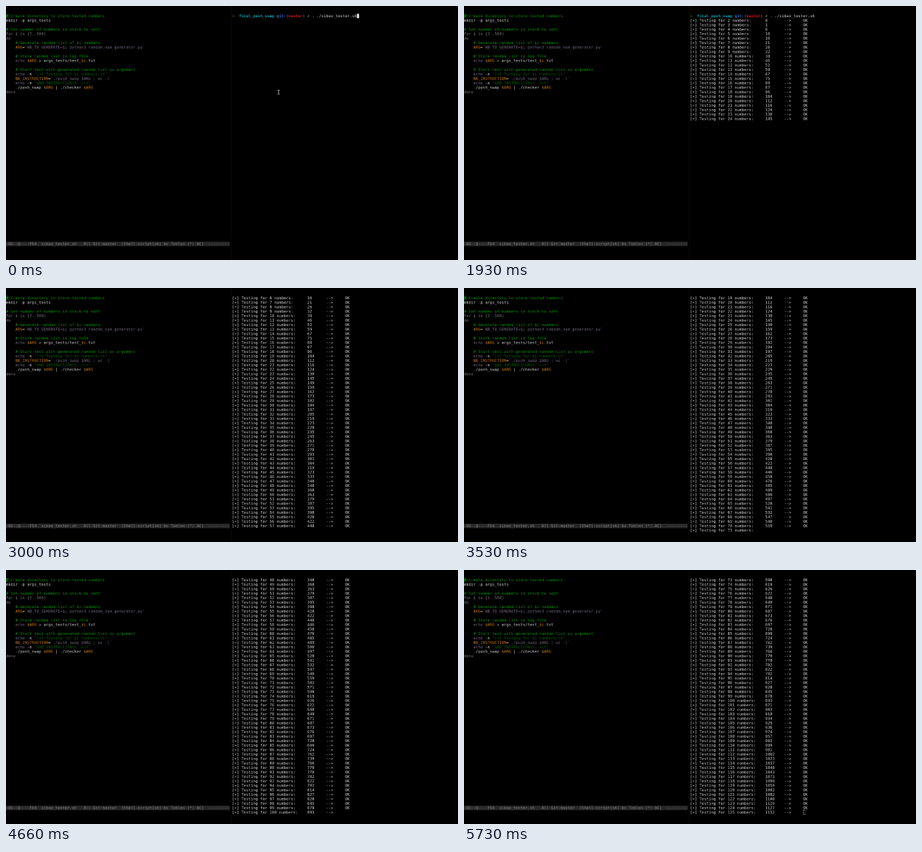
An HTML page with a canvas that plays this animation: 640 px wide and 360 px high, repeating every 5800 ms.

```html
<!DOCTYPE html>
<html lang="en">
<head>
<meta charset="utf-8">
<title>Sort tester</title>
<style>
html, body { margin: 0; width: 100%; height: 100%; overflow: hidden; background: #000; }
canvas { display: block; width: 640px; height: 360px; }
</style>
</head>
<body>
<canvas id="stage" width="640" height="360"></canvas>
<script>
const LOOP = 5800, FRAMES = 87, FPMS = 0.015;
const CW = 10, LH = 19, TOP = 33, ASCENT = 15, LAST_ROW = 52;
const RIGHT = 960, ENTER = 1000, BLINK = 640, BLUR = 5700;
const FONT = '16px "DejaVu Sans Mono", "DejaVu Sans", monospace';

const WHITE = '#dedede', GREEN = '#0a9c0a', STRING = '#0a640a', GREY = '#7c7c7c',
      MAUVE = '#766c80', ORANGE = '#d27e1a', BAR = '#272727', BAR_TEXT = '#888',
      TEAL = '#18a2ae', BLUE = '#3c64c4', RED = '#c01c1c', YELLOW = '#d0b420';

// Key points: time in ms, tests finished by then
const PACE = [[1165, 0], [3000, 56.3], [4000, 81.3], [4667, 98.87], [LOOP, 125.45]];

// Row, column, then colour and text in turn
const SCRIPT = [
  [0, 0, GREEN, '# Create directory to store tested numbers'],
  [1, 0, WHITE, 'mkdir -p args_tests'],
  [3, 0, GREEN, '# Set number of numbers in stack to sort'],
  [4, 0, GREY, 'for ', WHITE, 'i ', GREY, 'in {2..500}'],
  [5, 0, GREY, 'do'],
  [6, 4, GREEN, '# Generate random list of $i numbers'],
  [7, 4, ORANGE, 'ARG', WHITE, '=', MAUVE, '`NB_TO_GENERATE=$i python3 random_num_generator.py`'],
  [9, 4, GREEN, '# Store random list in log file'],
  [10, 4, MAUVE, 'echo ', ORANGE, '$ARG', WHITE, ' > args_tests/test_', ORANGE, '$i', WHITE, '.txt'],
  [12, 4, GREEN, '# Start test with generated random list as argument'],
  [13, 4, MAUVE, 'echo ', WHITE, '-n ', STRING, '"[+] Testing for $i numbers:\\t"'],
  [14, 4, ORANGE, 'NB_INSTRUCTION', WHITE, '=', MAUVE, '`./push_swap $ARG | wc -l`'],
  [15, 4, MAUVE, 'echo ', WHITE, '-n ', STRING, '"$NB_INSTRUCTION\\t-->\\t"'],
  [16, 4, WHITE, './push_swap ', ORANGE, '$ARG', WHITE, ' | ./checker ', ORANGE, '$ARG'],
  [17, 0, GREY, 'done']
];
const STATUS = '-UU-:@----F64  xibao_tester.sh   All Git:master  (Shell-script[sh] bs Toblen (*) AC)  ---------';
const PROMPT = [GREEN, '➜  ', TEAL, 'final_push_swap ', BLUE, 'git:(', RED, 'master',
                BLUE, ') ', YELLOW, '✗ ', WHITE, '. ./xibao_tester.sh'];

const out = document.getElementById('stage').getContext('2d');
const screen = document.createElement('canvas');
screen.width = 1920;
screen.height = 1080;
const g = screen.getContext('2d');

const rowY = row => TOP + row * LH;

// Sorting cost grows as n log n, with a few percent of seeded scatter
function instructions(n) {
  const noise = Math.sin(n * 127.1) * 43758.5453;
  const scatter = (noise - Math.floor(noise) - 0.5) * 0.06;
  return Math.max(0, Math.round(1.33 * n * Math.log2(n) * (1 + scatter) - 5));
}

function text(x, row, str, color, bold) {
  g.font = (bold ? 'bold ' : '') + FONT;
  g.fillStyle = color;
  for (const ch of str) {
    if (ch !== ' ') g.fillText(ch, x, rowY(row) + ASCENT);
    x += CW;
  }
  return x;
}

function runs(x, row, parts, bold) {
  for (let i = 0; i < parts.length; i += 2) {
    x = text(x, row, parts[i + 1], parts[i], bold && parts[i] !== WHITE);
  }
}

function block(x, row) {
  g.fillStyle = WHITE;
  g.fillRect(x, rowY(row), CW, LH);
}

function hollow(x, row, color) {
  g.strokeStyle = color;
  g.lineWidth = 1;
  g.strokeRect(x + 0.5, rowY(row) + 0.5, CW - 1, LH - 1);
}

function pointer() {
  g.strokeStyle = WHITE;
  g.lineWidth = 2;
  g.beginPath();
  g.moveTo(1153, 358); g.lineTo(1163, 358);
  g.moveTo(1158, 358); g.lineTo(1158, 375);
  g.moveTo(1153, 375); g.lineTo(1163, 375);
  g.stroke();
}

function testsDone(t) {
  if (t <= PACE[0][0]) return 0;
  const i = PACE.findIndex(p => t <= p[0]);
  const [t0, n0] = PACE[i - 1], [t1, n1] = PACE[i];
  return n0 + (n1 - n0) * (t - t0) / (t1 - t0);
}

function drawEditor() {
  for (const [row, col, ...parts] of SCRIPT) runs(col * CW, row, parts);
  hollow(0, 0, GREEN);
  g.fillStyle = BAR;
  g.fillRect(0, rowY(51), 95 * CW, LH);
  text(0, 51, STATUS, BAR_TEXT);
  g.fillStyle = '#121212';
  g.fillRect(956, 0, 2, 1080);
}

function drawTerminal(t) {
  const progress = testsDone(t), done = Math.floor(progress), phase = progress - done;
  const line = done + 1;
  const top = Math.max(0, line - LAST_ROW);
  if (!top) runs(RIGHT, 0, PROMPT, true);

  // The newest line prints in steps: label, then count, then result
  const col = phase < 0.6 ? 0 : phase < 0.75 ? 32 : 48;
  for (let n = Math.max(1, top); n <= line; n++) {
    const row = n - top, reached = n === line ? col : 56;
    if (reached >= 32) text(RIGHT, row, `[+] Testing for ${n + 1} numbers:`, WHITE);
    if (reached >= 48) {
      text(RIGHT + 32 * CW, row, String(instructions(n + 1)), WHITE);
      text(RIGHT + 40 * CW, row, '-->', WHITE);
    }
    if (reached >= 56) text(RIGHT + 48 * CW, row, 'OK', WHITE);
  }

  const x = RIGHT + col * CW, row = line - top;
  if (t < ENTER) {
    block(RIGHT + 53 * CW, 0);
    pointer();
  } else if (t > BLUR) {
    hollow(x, row, WHITE);
  } else if (Math.floor((t - ENTER) / BLINK) % 2 === 0) {
    block(x, row);
  }
}

let shown = -1;
function tick(now) {
  const index = Math.floor((now % LOOP + 6.7) * FPMS) % FRAMES;
  if (index !== shown) {
    shown = index;
    g.fillStyle = '#000';
    g.fillRect(0, 0, 1920, 1080);
    drawEditor();
    drawTerminal(index / FPMS + 0.01);
    out.imageSmoothingQuality = 'high';
    out.drawImage(screen, 0, 0, 640, 360);
  }
  requestAnimationFrame(tick);
}
tick(0);
</script>
</body>
</html>
```
